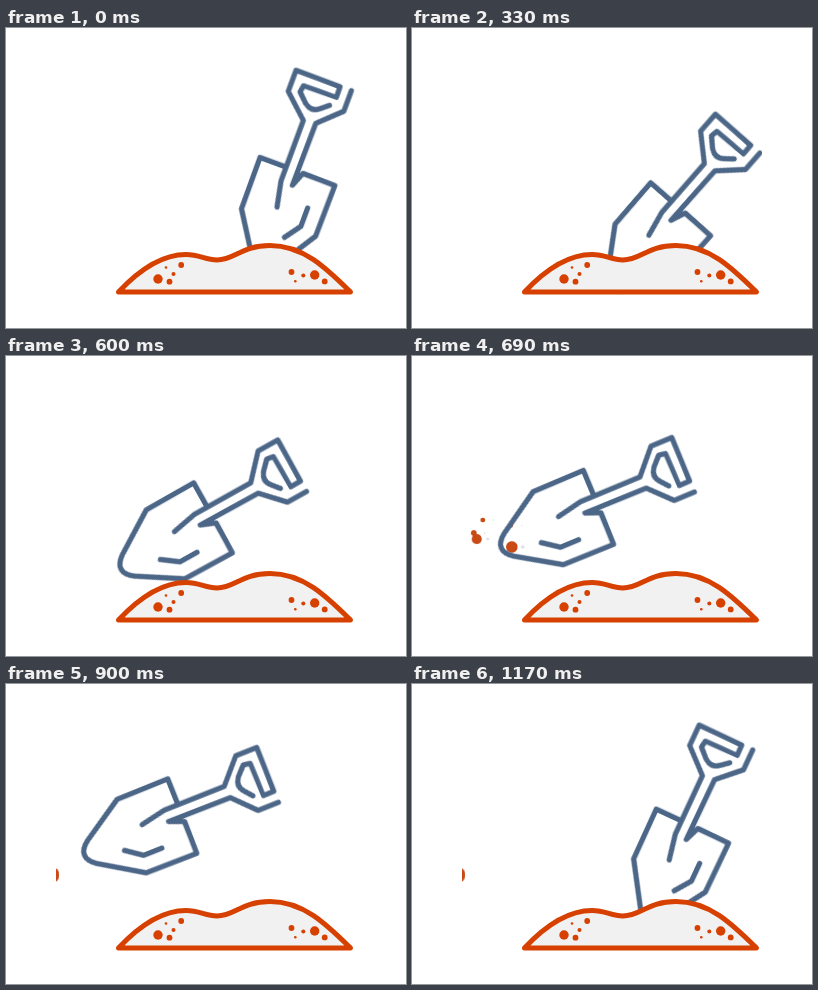
Write an HTML page without scripts that moves like this. It is 400 px wide and 300 px high and loops after 1.2 s.

```html
<!DOCTYPE html>
<html lang="en">
<head>
<meta charset="utf-8">
<title>Digging shovel</title>
<style>
  html, body { margin: 0; width: 100%; height: 100%; overflow: hidden; background: #fff; }
  svg { display: block; width: 100vw; height: 100vh; }

  .shovel, .drift, .arc, .clod {
    animation: 1.2s linear var(--lag, 0s) infinite;
  }
  .shovel {
    fill: none; stroke: #4c6687; stroke-width: 5.2;
    stroke-linecap: round; stroke-linejoin: round;
    animation-name: dig;
  }
  .mound { fill: #f1f1f1; stroke: #d64000; stroke-width: 5; stroke-linejoin: round; }
  .pebbles { fill: #d64000; }

  .soil { fill: #c94a14; }
  .trail { fill: #e2e2e2; --lag: -1.17s; } /* one 30 ms step behind the soil */
  .drift { animation-name: drift; }
  .arc { animation-name: arc; }
  .clod { animation-name: clod; transform-box: fill-box; transform-origin: center; }

  @keyframes dig {
    0%, 100% { transform: translate(289.3px, 148.3px) rotate(20.2deg); }
    10% { transform: translate(282.3px, 164.3px) rotate(27.3deg); }
    25% { transform: translate(272px, 187.5px) rotate(38.9deg); }
    50% { transform: translate(202.4px, 164.3px) rotate(60.7deg); }
    65% { transform: translate(160.8px, 142.2px) rotate(74deg); }
    70% { transform: translate(147px, 130.8px) rotate(78.2deg); }
  }
  @keyframes drift {
    0%, 20% { transform: translateX(131.4px); }
    70%, 100% { transform: translateX(-87.6px); }
  }
  @keyframes arc {
    0%, 20% { transform: translateY(52.8px); animation-timing-function: cubic-bezier(.333, .667, .667, 1); }
    50%, 100% { transform: none; }
  }
  @keyframes clod {
    0%, 20% { transform: scale(0); }
    25%, 50% { transform: scale(1); }
    65%, 100% { transform: scale(0); }
  }
</style>
</head>
<body>
<svg viewBox="0 0 400 300">
  <defs>
    <clipPath id="window"><rect x="50" width="300" height="300"/></clipPath>
    <g id="clods">
      <circle class="clod" cx="133" cy="191" r="8"/>
      <circle class="clod" cx="98" cy="183" r="7"/>
      <circle class="clod" cx="95" cy="177" r="4"/>
      <circle class="clod" cx="104" cy="164" r="3.3"/>
      <circle class="clod" cx="132" cy="169.5" r="3"/>
    </g>
  </defs>

  <g clip-path="url(#window)">
    <g class="trail"><g class="drift"><g class="arc"><use href="#clods"/></g></g></g>
    <g class="soil"><g class="drift"><g class="arc"><use href="#clods"/></g></g></g>

    <g class="shovel">
      <g transform="translate(-36 -100)">
        <!-- grip and left side of the shaft -->
        <path d="M43.5 21.4 L36 27.8 Q28.5 34 21 28.3 L11.3 19 L12.4 12 L47.2 11.5 L47 .4 L0 0 V22.7 L24.2 44.7 V109 L29.5 135"/>
        <!-- right side of the shaft and blade -->
        <path d="M59 .2 V22 L36.9 43.2 L36.4 109.2 L42.3 94.4 L76.3 94.9 L75.8 149 L49.3 190.9 Q36.5 209 23.7 190.9 L-3.2 149 L-3.6 94.3 L22.2 94.4"/>
        <path d="M58.6 125.4 V144.9 L47 160.9"/>
      </g>
    </g>

    <path class="mound" d="M112.5 264 C134 241 158 226.5 180 226.5 C194 226.5 199 232 211 232 C229 232 235 217.5 264 217.5 C298 217.5 321 241 344.5 264 Z"/>
    <g class="pebbles">
      <circle cx="152" cy="251" r="4.7"/>
      <circle cx="163.5" cy="253.7" r="2.9"/>
      <circle cx="167.5" cy="246" r="2"/>
      <circle cx="160" cy="239.5" r="1.3"/>
      <circle cx="175.2" cy="237" r="2.9"/>
      <circle cx="285.5" cy="244" r="2.9"/>
      <circle cx="297.3" cy="247.5" r="2"/>
      <circle cx="289.3" cy="253.2" r="1.3"/>
      <circle cx="308.7" cy="247" r="4.7"/>
      <circle cx="318.7" cy="253.4" r="2.9"/>
    </g>
  </g>
</svg>
</body>
</html>
```
